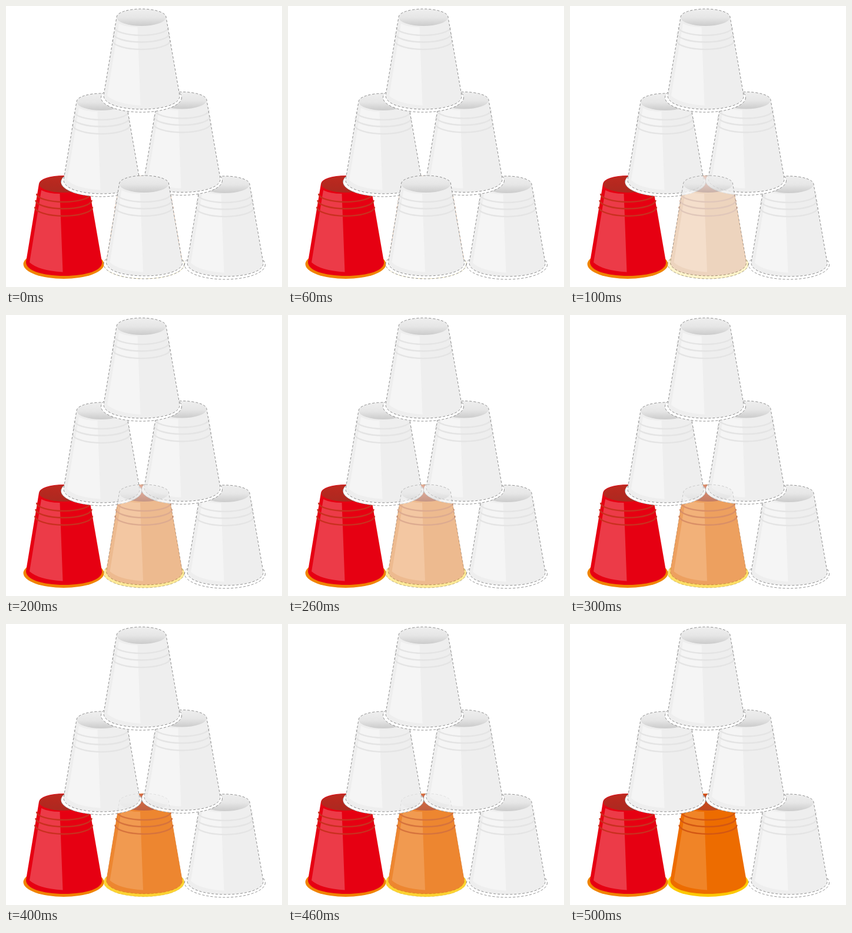
Animation of 469x479 px, one loop 0.6 s. Source, as an HTML page:

```html
<!DOCTYPE html>
<html lang="en">
<head>
<meta charset="utf-8">
<title>Cup pyramid</title>
<style>
  html, body { margin: 0; width: 100%; height: 100%; overflow: hidden; background: #fff; }
  svg { display: block; width: 100vw; height: 100vh; }
</style>
</head>
<body>
<svg id="stage" viewBox="0 0 469 479">
  <defs id="defs"></defs>
</svg>
<script>
const stage = document.getElementById('stage');
const defs = document.getElementById('defs');

const palettes = {
  empty: { body: '#eeeeee', shine: '#f5f5f5', band: '#e4e4e4', rim: '#ffffff', inside: ['#eeeeee', '#e6e6e6', '#cbcbcb'], dashed: true },
  red: { body: '#e60012', shine: '#ec3b48', band: '#c9301f', rim: '#f08300', inside: ['#bd2a20', '#b5281f', '#ab2a20'] },
  orange: { body: '#ed6c00', shine: '#f08427', band: '#d35713', rim: '#fcc800', inside: ['#cf4a1c', '#c9481c', '#bd481f'] }
};

const BODY = 'M188 19A42 14 0 0 1 272 19L295 152C297 167 268 176 231 176C194 176 165 167 166 152Z';
const SHINE = 'M192 30Q204 36 223.500 36L228.500 169.500Q187 167 172 153Z';
// Half width, height of the ends, depth
const BANDS = [[46, 36, 14], [47.5, 47, 14.500], [49, 58.500, 15.500]];

function add(parent, tag, attrs) {
  const node = document.createElementNS('http://www.w3.org/2000/svg', tag);
  for (const key in attrs) node.setAttribute(key, attrs[key]);
  parent.appendChild(node);
  return node;
}

function addGradient(name, colors) {
  const gradient = add(defs, 'linearGradient', { id: name, x1: 0, y1: 0, x2: 0, y2: 1 });
  colors.forEach((color, i) => add(gradient, 'stop', { offset: i / (colors.length - 1), 'stop-color': color }));
}

function addCup(kind, x, y) {
  const p = palettes[kind];
  const cup = add(stage, 'g', { transform: `translate(${x} ${y})` });
  const dash = p.dashed ? { stroke: '#8c8c8c', 'stroke-width': 1, 'stroke-dasharray': '4 3' } : {};
  add(cup, 'ellipse', { cx: 230, cy: 156, rx: 68.5, ry: 25, fill: p.rim, ...dash });
  add(cup, 'path', { d: BODY, fill: p.body });
  add(cup, 'path', { d: SHINE, fill: p.shine });
  add(cup, 'ellipse', { cx: 230, cy: 19.8, rx: 41.5, ry: 14.2, fill: `url(#${kind})` });
  for (const [w, top, depth] of BANDS) {
    add(cup, 'path', {
      d: `M${230 - w} ${top}A${w} ${depth} 0 0 0 ${230 + w} ${top}`,
      fill: 'none', stroke: p.band, 'stroke-width': 2.4
    });
  }
  if (p.dashed) add(cup, 'path', { d: BODY, fill: 'none', ...dash });
  return cup;
}

for (const kind in palettes) addGradient(kind, palettes[kind].inside);

addCup('red', -132, 284);
addCup('orange', 4.5, 284);
addCup('empty', 142, 285);
addCup('empty', -68, 144);
addCup('empty', 69, 141.5);
addCup('empty', 0, 0);
const cover = addCup('empty', 4.5, 284);

const STEP = 100, STEPS = 6;

function draw(time) {
  const step = Math.floor(time / STEP) % STEPS;
  cover.setAttribute('opacity', 1 - step / (STEPS - 1));
}

const start = performance.now();
function tick() {
  draw(performance.now() - start);
  requestAnimationFrame(tick);
}
draw(0);
requestAnimationFrame(tick);
</script>
</body>
</html>
```
